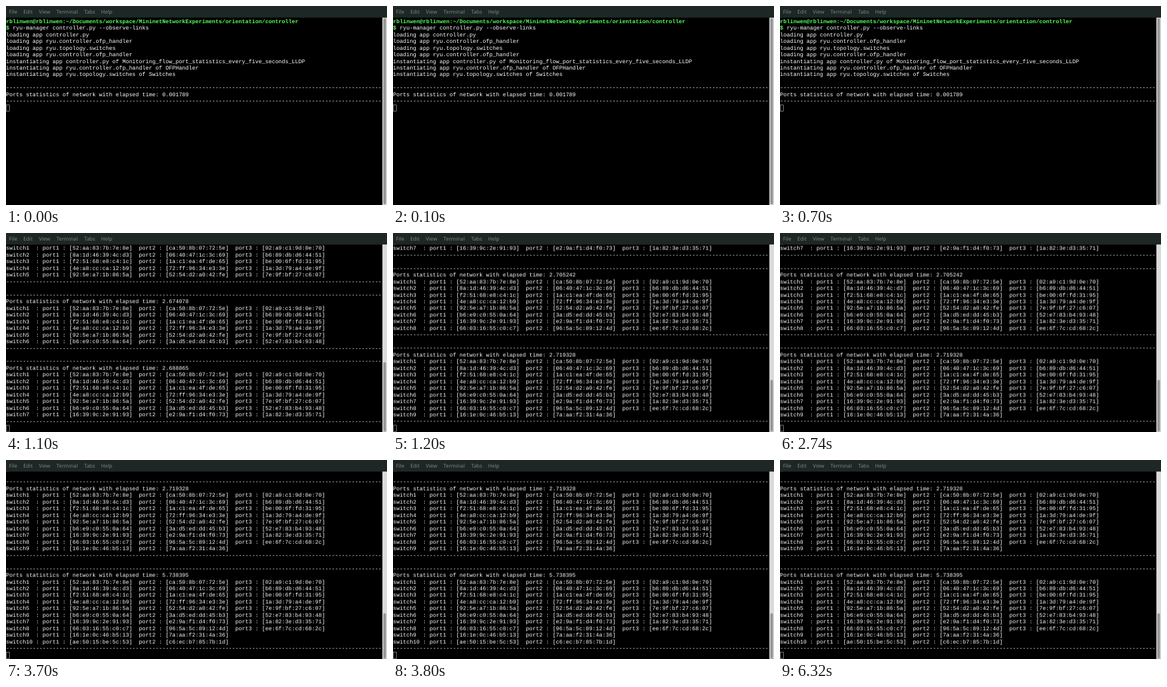
Write an HTML page that moves like this. It is 600 px wide and 313 px high and loops after 8000 ms.

```html
<!DOCTYPE html>
<html lang="en">
<head>
<meta charset="utf-8">
<title>Terminal</title>
<style>
  html, body { margin: 0; width: 100%; height: 100%; overflow: hidden; background: #000; }
  #term {
    position: absolute; width: 1146px; height: 598px; overflow: hidden;
    background: #000; transform: scale(.52356); transform-origin: 0 0;
    text-rendering: geometricPrecision;
  }
  #menu {
    position: absolute; z-index: 1; width: 100%; height: 35px;
    background: #1e2626; color: #7c8282;
    font: 15.6px/35px "Noto Sans", sans-serif;
  }
  #menu span { position: absolute; top: 0; }
  #view { position: absolute; top: 35px; width: 100%; height: 563px; overflow: hidden; }
  #strip { animation: show 8s step-end infinite; }
  .screen { position: relative; height: 563px; }
  pre {
    position: absolute; top: 3px; left: 0; margin: 0; color: #fff;
    font: 16.664px/20px "Liberation Mono", monospace;
  }
  b { color: #55ff55; }
  .cursor {
    position: absolute; left: 0; width: 11px; height: 20px; margin-top: -1px;
    box-sizing: border-box; border: 1.9px solid #e6e6e6;
  }
  .bar { position: absolute; right: 0; width: 14px; height: 100%; background: #dadadc; }
  .thumb { position: absolute; left: 3px; right: 3px; bottom: 2px; background: #979696; border-radius: 4px; }
  @keyframes show {
    0% { transform: translateY(0); }
    13.75% { transform: translateY(-563px); }
    15% { transform: translateY(-1126px); }
    46.25%, 100% { transform: translateY(-1689px); }
  }
</style>
</head>
<body>
<div id="term">
  <div id="menu">
    <span style="left:9px">File</span>
    <span style="left:52px">Edit</span>
    <span style="left:99px">View</span>
    <span style="left:152px">Terminal</span>
    <span style="left:235px">Tabs</span>
    <span style="left:286px">Help</span>
  </div>
  <div id="view"><div id="strip"></div></div>
</div>
<script>
  const ROWS = 28;
  const RULE = "-".repeat(113);

  const ports = [
    "52:aa:83:7b:7e:8e ca:50:8b:07:72:5e 02:a9:c1:9d:0e:70",
    "8a:1d:46:39:4c:d3 06:40:47:1c:3c:69 b6:89:db:d6:44:51",
    "f2:51:68:e8:c4:1c 1a:c1:ea:4f:de:65 be:00:6f:fd:31:95",
    "4e:a8:cc:ca:12:b9 72:ff:96:34:e3:3e 1a:3d:79:a4:de:9f",
    "92:5e:a7:1b:86:5a 52:54:d2:a0:42:fe 7e:9f:bf:27:c6:07",
    "b6:e9:c0:55:0a:64 3a:d5:ed:dd:45:b3 52:e7:83:b4:93:48",
    "16:39:9c:2e:91:93 e2:9a:f1:d4:f0:73 1a:82:3e:d3:35:71",
    "66:03:16:55:c0:c7 96:5a:5c:89:12:4d ee:6f:7c:cd:68:2c",
    "16:1e:0c:46:b5:13 7a:aa:f2:31:4a:36",
    "ae:50:15:be:5c:53 c6:ec:b7:85:7b:1d"
  ];

  const switchRow = (macs, i) => `switch${i + 1}`.padEnd(9) + ": " +
    macs.split(" ").map((mac, p) => `port${p + 1} : [${mac}]`).join("  ");

  const report = (time, count) => [
    "", RULE, `Ports statistics of network with elapsed time: ${time}`,
    ...ports.slice(0, count).map(switchRow), RULE
  ];

  const startup = [
    "<b>rblinwen@rblinwen:~/Documents/workspace/MininetNetworkExperiments/orientation/controller</b>",
    "<b>$</b> ryu-manager controller.py --observe-links",
    "loading app controller.py",
    "loading app ryu.controller.ofp_handler",
    "loading app ryu.topology.switches",
    "loading app ryu.controller.ofp_handler",
    "instantiating app controller.py of Monitoring_flow_port_statistics_every_five_seconds_LLDP",
    "instantiating app ryu.controller.ofp_handler of OFPHandler",
    "instantiating app ryu.topology.switches of Switches"
  ];

  // The parser drops the first newline in a <pre>, so one is spent up front.
  function screen(log, thumbTop) {
    const lines = log.slice(1 - ROWS);
    return `<div class="screen"><pre>\n${lines.join("\n")}` +
      `<i class="cursor" style="top:${lines.length * 20}px"></i></pre>` +
      `<div class="bar"><div class="thumb" style="top:${thumbTop}px"></div></div></div>`;
  }

  const five = report("2.659871", 5);
  const six = report("2.674078", 6);
  const seven = report("2.688865", 7);
  const eight = report("2.705242", 8);
  const nine = report("2.719328", 9);
  const ten = report("5.738395", 10);

  document.getElementById("strip").innerHTML =
    screen([...startup, ...report("0.001789", 0)], 2) +
    screen([...five, ...six, ...seven], 353) +
    screen([...seven, ...eight, ...nine], 406) +
    screen([...nine, ...ten], 425);
</script>
</body>
</html>
```
